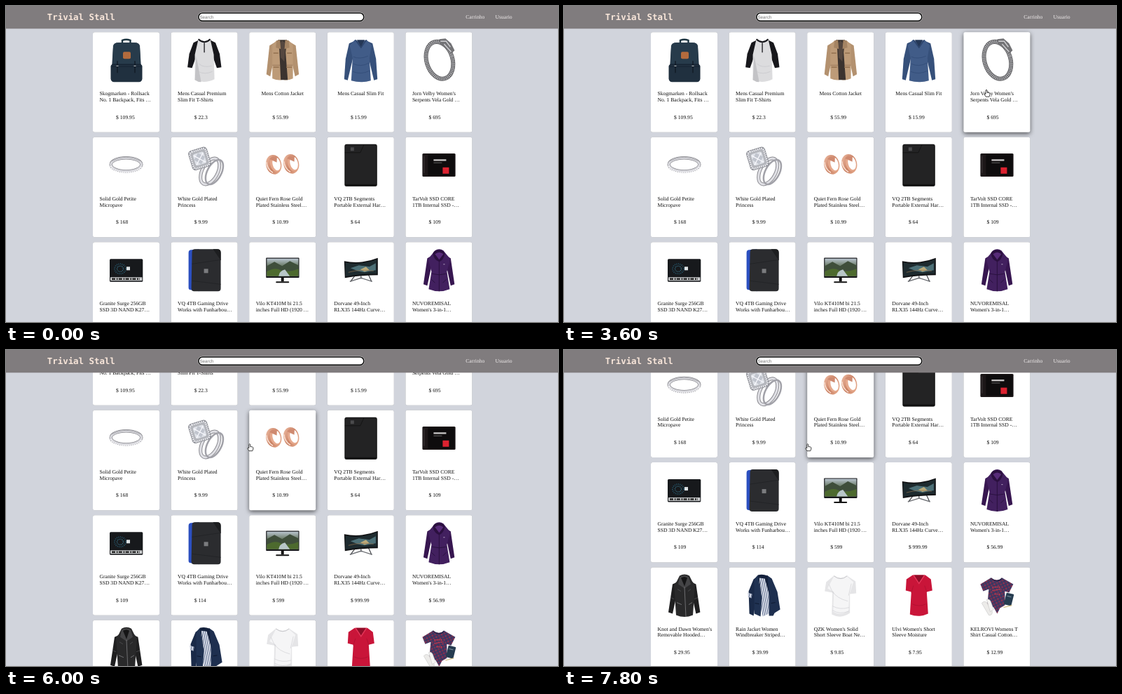
An HTML page for the animation above (8000 ms loop, 788 by 450 pixels).

```html
<!DOCTYPE html>
<html lang="pt">
<head>
<meta charset="utf-8">
<title>Trivial Stall</title>
<style>
  html, body { margin: 0; width: 100%; height: 100%; overflow: hidden; background: #d1d4dc; }
  svg { display: block; }
  text { font: 7.6px "Liberation Serif", serif; fill: #111; text-rendering: geometricPrecision; }
  .card > rect:first-child { fill: #fff; filter: drop-shadow(.8px .8px .6px rgba(0,0,0,.38)); }
  .card.hover > rect:first-child { filter: drop-shadow(0 2px 3px rgba(0,0,0,.6)); }
  .nav { fill: #f1eeee; }
  .brand { font: bold 12.4px "DejaVu Sans Mono", monospace; fill: #f8e6da; }
  .hint { font: 6.3px "Liberation Sans", sans-serif; fill: #757575; }
</style>
</head>
<body>
<svg width="788" height="450" viewBox="0 0 788 450">
  <defs>
    <linearGradient id="scene" x2="0" y2="1">
      <stop offset="0" stop-color="#b9c4cf"/><stop offset=".4" stop-color="#6d7d6a"/>
      <stop offset=".65" stop-color="#3d5330"/><stop offset="1" stop-color="#8a8f92"/>
    </linearGradient>
    <linearGradient id="silver" y2="1">
      <stop offset="0" stop-color="#8d8d92"/><stop offset=".5" stop-color="#e2e2e6"/>
      <stop offset="1" stop-color="#85858b"/>
    </linearGradient>
    <linearGradient id="rose" y2="1">
      <stop offset="0" stop-color="#f3c5ad"/><stop offset=".5" stop-color="#c87f62"/>
      <stop offset="1" stop-color="#f0b899"/>
    </linearGradient>
    <pattern id="stripes" width="3" height="3" patternUnits="userSpaceOnUse" patternTransform="rotate(12)">
      <rect width="3" height="3" fill="#dfe4ee"/><rect width="1.2" height="3" fill="#6b7896"/>
    </pattern>
    <pattern id="floral" width="6" height="6" patternUnits="userSpaceOnUse" patternTransform="rotate(20)">
      <rect width="6" height="6" fill="#3b3763"/><circle cx="1.5" cy="1.5" r="1.2" fill="#a52d48"/>
      <circle cx="4.5" cy="4.5" r="1.2" fill="#8c3049"/>
    </pattern>
  </defs>
  <g id="shelf"></g>
  <rect width="788" height="32.3" fill="#807c7e"/>
  <text class="brand" x="58.8" y="20">Trivial Stall</text>
  <rect x="273.6" y="8.8" width="238.4" height="13.8" rx="6.9" fill="#e8e8e8"/>
  <rect x="274.8" y="10" width="236" height="11.4" rx="5.7" fill="#fff" stroke="#0a0a0a" stroke-width="1.6"/>
  <text class="hint" x="276.4" y="18.2">Search</text>
  <text class="nav" x="656.3" y="18.3">Carrinho</text>
  <text class="nav" x="698.6" y="18.3">Usuario</text>
  <g id="cursor" stroke="#111" stroke-width=".8" stroke-linejoin="round" fill="#fff">
    <path id="hand" d="M-1 1Q0-.6 1 1V4.2Q4.6 4 5 5.4V7.6L4 10.2H-.8L-3 6.6Q-3 5.2-1 6.4Z"/>
    <path id="arrow" d="M0 0V9L2 7.2 3.4 10.2 4.7 9.6 3.4 6.7H6.2Z" fill="#111" stroke="#fff"/>
  </g>
</svg>
<script>
const path = (d, fill, more = '') => `<path d="${d}" fill="${fill}" ${more}/>`;
const line = (d, color, width = .7, more = '') =>
  path(d, 'none', `stroke="${color}" stroke-width="${width}" ${more}`);
const box = (x, y, w, h, fill, r = 0) =>
  `<rect x="${x}" y="${y}" width="${w}" height="${h}" rx="${r}" fill="${fill}"/>`;
const oval = (x, y, rx, ry, fill, more = '') =>
  `<ellipse cx="${x}" cy="${y}" rx="${rx}" ry="${ry}" fill="${fill}" ${more}/>`;
const ring = (x, y, rx, ry, color, width, more = '') =>
  oval(x, y, rx, ry, 'none', `stroke="${color}" stroke-width="${width}" ${more}`);
const turn = (deg, x, y, s) => `<g transform="rotate(${deg} ${x} ${y})">${s}</g>`;
const mirror = s => s + `<g transform="matrix(-1 0 0 1 95.4 0)">${s}</g>`;

// Each picture is drawn in the coordinates of its card.
const backpack = line('M42 18V11.5Q47.7 9.5 53.5 11.5V18', '#1c3440', 2.4) +
  box(25.5, 46, 45, 23, '#1c2c3a', 3) +
  path('M29 20Q30 15 36 15H60Q66 15 67 20L70 68Q69 71 66 71H30Q27 71 26 68Z', '#20303f') +
  path('M29 20Q30 15 36 15H60Q66 15 67 20L68 45H28Z', '#273b4b') +
  line('M27 46H69M27 49H69', '#141f2b') + line('M35 41V58M60 41V58', '#121b25', 1.4) +
  line('M33.5 48H36.5M58.5 48H61.5', '#a9b0b4', 1.2) + box(43, 28, 11, 10, '#b36b3d', 2);

const raglan = mirror(path('M40 11L32 15 26 31 23.5 50 30 51 36 34Z', '#17171b')) +
  path('M39 10Q47.7 15 56 10L61 32 62 67Q48 74 34 68L34 32Z', '#dcdcde') +
  path('M36 34L34 68Q38 71 43 71Z', '#c3c3c6') +
  line('M39 10Q47.7 18 56 10', '#17171b', 2) + line('M47.5 15V29', '#25252a', 1.4) +
  line('M40 45Q46 51 58 48M39 56Q48 61 59 56', '#c6c6ca');

const jacket = mirror(path('M39 13L29 19 24.5 60 30 63 35 40Z', '#b3916f') +
  path('M39 12L33 18 33 66Q40 69 46 68V18Z', '#bd9b78')) +
  path('M41 11H54L52 29 55 68H45L43 25Z', '#3b332f') +
  path('M44 16L47 12 52 16 50 42 45 36Z', '#55473f') +
  mirror(path('M39 12L44 11 45 24 38 22Z', '#a58463') + box(34.5, 29, 7, 1.6, '#967452') +
    box(34.5, 49, 8, 1.6, '#967452')) + line('M33 47H44M53 47H62', '#8f6e4f');

const sweater = mirror(path('M40 12L31 16 26 38 24 67 29 68.5 36 39Z', '#36507a')) +
  path('M39 11Q47.7 15 56 11L63 19 60 37 62 69Q48 73 34 69L36 37 32 19Z', '#415c88') +
  path('M42 11H53.5L48 21Z', '#243756') + line('M40 11L48 22 55.5 11', '#2c436a', 1.5) +
  line('M37 35Q46 39 58 34M37 45Q48 50 59 44M36 56Q48 61 60 55', '#304a74');

const bracelet = turn(-17, 48.5, 40,
  ring(48.5, 40, 18.5, 27, '#606063', 6) + ring(48.5, 40, 18.5, 27, '#bdbdc0', 4.2, 'stroke-dasharray="1.3 1.1"') +
  ring(48.5, 40, 18.5, 27, '#77777a', .8)) +
  path('M48 10L57 9 65 16 70 26 65 31 59 24 50 18Z', '#737376') +
  line('M50 13L58 13 64 21M55 17L65 28', '#d0d0d3', 1.4);

const band = ring(47.5, 39, 21.8, 9.6, '#85858b', 4.4) + ring(47.5, 39, 21.8, 9.6, '#d9d9de', 3) +
  line('M25.7 41A21.8 9.6 0 0 0 69.3 41', '#f9f9fb', 2.5, 'stroke-dasharray="1.6 1.2"') +
  line('M27 34Q47 23 68 34', '#a9a9ae', 1);

const solitaire = turn(28, 56, 50, ring(55, 49, 11, 20, '#8b8b91', 5) + ring(55, 49, 11, 20, '#e0e0e5', 3) +
  ring(61, 47, 10, 19, '#a1a1a8', 2.5)) +
  turn(-17, 41, 31, box(27, 16, 28, 29, '#8c8e95', 5) +
  '<rect x="29" y="18" width="24" height="25" rx="4" fill="#b4b6bc" stroke="#f2f2f6" stroke-width="2.4" stroke-dasharray="1.5 1.3"/>' +
  box(33, 22, 16, 17, '#dfe2e8', 3) + path('M33 30L41 22 49 30 41 39Z', '#c1c5ce') +
  line('M34 24L48 38M48 24L34 38', '#fafaff', 1.2));

const hoop = (x, y, deg) => turn(deg, x, y, oval(x, y, 11, 14, 'url(#rose)') +
  oval(x + 2.5, y, 7.5, 11, '#e6a98d') + oval(x + 4, y, 5.5, 9.5, '#fff') +
  path(`M${x - 4} ${y - 9}Q${x + 1} ${y - 13} ${x + 7} ${y - 9}L${x + 5} ${y - 2}Q${x} ${y - 5}${x - 4} ${y - 3}Z`, '#cf8a70') +
  line(`M${x - 9} ${y - 6}Q${x - 11} ${y + 3} ${x - 4} ${y + 11}`, '#fbe3d6', 1.4));
const hoops = hoop(35, 39, -14) + hoop(60, 38, -14);

const drive = box(24.5, 10, 46.5, 60, '#191919', 3) + box(26, 11, 43.5, 57, '#232324', 2) +
  line('M25 22H47L52 11', '#111', .8) + box(33, 14.5, 5, 5, '#4b4b4d') + box(25, 67, 45.5, 2.6, '#111', 1);

const ssd = box(24, 23.3, 47.2, 33, '#1c1718', 1.5) + box(32, 25, 38, 29.5, '#0e0c0d') +
  box(40, 31.5, 18, 2.3, '#c8c6c6') + box(40, 36, 12, .8, '#777') + box(53, 43, 9, 9, '#dc2230') +
  box(26, 27, 1, 24, '#40383a');

const chipSsd = box(24, 24, 47.3, 32.5, '#17191c', 1.5) + box(25, 50, 45.3, 4.8, '#d0d2d3') +
  line('M27 52.4H67', '#222', 2.6, 'stroke-dasharray="5 1.6 2 1.2"') +
  ring(39, 38, 8, 7, '#24576d', 2, 'stroke-dasharray="1 1.5"') +
  ring(39, 38, 4.5, 4, '#3a7b92', 1.3, 'stroke-dasharray="1 1.2"') + box(48, 35, 5, 5, '#dfe4e6');

const blueDrive = path('M25 15Q25 11 29 11L40 10V70L28 68Q25 68 25 65Z', '#2b4fc0') +
  path('M30 14Q30 10 34 10H66Q71 10 71 15V66Q71 70 67 70H33Q29 70 29 66Z', '#2b2c2f') +
  path('M60 10H66Q71 10 71 15V26Z', '#1d1e20') + line('M30 31L71 25M30 55L71 60', '#202124') +
  box(47, 38, 6, 6, '#7b7c7f');

const monitor = box(24, 22.3, 47.3, 28.5, '#16171a', .8) + box(25.2, 23.4, 45, 25, 'url(#scene)') +
  path('M25.2 34L36 28 47 34 58 27 70.2 33V41H25.2Z', '#3f4e3b') +
  path('M25.2 42Q37 35 45 40T70.2 38V48.4H25.2Z', '#4d6a2e') +
  path('M42 48.4Q43 41 51 39L58 48.4Z', '#b8c6c8') + box(45.5, 50, 4, 6, '#151515') +
  box(38, 56, 19, 2, '#151515', 1);

const wide = line('M39 48L33 56M58 45L63 56M48 48V52', '#4b4d51', 1.3) + line('M32 56L48 51 64 56', '#6b6d72', 1.3) +
  path('M24 27Q48 32 72 22.5V47Q48 47 25 51Z', '#111214') +
  path('M25.5 29Q48 33.5 70.5 24.5V45Q48 45 26 49Z', '#1e2b2f') +
  path('M33 37L45 33 60 35 69 30V40L53 43 43 41Z', '#4d7077') +
  path('M47 39L55 35 60 40 53 42Z', '#bcab7b') + line('M30 43Q48 38 66 41', '#92724e');

const parka = mirror(path('M40 18L31 23 25.5 60 31 62 36 39Z', '#371650')) +
  path('M38 17L42 12Q48 8 54 12L58 17 64 24 59 42 63 67Q48 73 33 67L37 42 32 24Z', '#42205f') +
  path('M39 16Q41 11 48 11T56 17Q54 26 48 28 40 25 39 16Z', '#2b103f') +
  path('M42 17Q48 12 54 17L48 25Z', '#572b78') + line('M48 27V70M38 45Q48 48 58 45M37 53L42 58M58 53L53 58', '#28103b', .9) +
  box(54, 31, 2, 1, '#b8a6c6');

const biker = mirror(path('M40 20L31 24 25 64 31 66 36 43Z', '#1f1f20')) +
  path('M37 20L41 12Q48 8 55 12L59 20 63 25 60 68Q48 73 36 68L33 25Z', '#29292a') +
  path('M41 14Q48 9 54 14L57 24 48 30 39 24Z', '#444446') + path('M43 15Q48 12 52 15L48 27Z', '#151516') +
  line('M48 28L50 70M37 50L44 53M59 50L54 53', '#8c8c8e') +
  line('M38 31L43 34M57 31L53 34M28 43L33 45M67 43L62 45', '#57575a');

const blazer = path('M42 12L35 17 28 34 29 66 35 69 39 43 53 43Z', '#1a2a48') +
  path('M43 13L57 14 61 64 48 70 40 37Z', 'url(#stripes)') +
  path('M41 11L36 17 36 66 45 70 47 44Z', '#203252') +
  path('M54 11L61 16 69 35 73 60 65 65 63 69 57 69 57 40Z', '#1e2f4f') +
  path('M41 11Q48 9 55 12L57 37 51 16 43 15 47 43Z', '#14213c') +
  path('M27 36L33 38 32 44 27 42Z', 'url(#stripes)') + line('M37 51L43 52M60 51L66 50', '#0e1930', 1);

const blouse = path('M38 12Q48 18 57 12L69 20 70 37 61 38 61 65Q48 74 35 67L36 36 25 34 27 21Z', '#e5e5e7') +
  path('M38 13Q48 19 57 13L66 21 60 39 59 62Q47 70 37 63L38 35 29 30Z', '#f5f5f6') +
  line('M38 12Q48 20 57 12', '#c6c6ca', 1) +
  line('M36 34Q42 44 58 48M36 55Q47 61 60 57M36 61Q47 68 60 62M63 23L59 40M31 24L37 37', '#d1d1d6');

const tee = path('M39 11L57 11 65 17 67 33 59 35 61 66Q48 72 35 67L37 35 29 33 30 17Z', '#c91539') +
  path('M41 11H55L48 22Z', '#8f0d28') + line('M40 11L48 23 56 11', '#e3375a', 1.4) +
  line('M37 36L40 26M59 35L56 26M38 52Q48 57 58 52', '#a90f2e');

const knot = path('M39 15Q48 21 55 15L71 24 65 36 59 34 59 54 52 58 48 66 43 57 34 52 36 31 28 34 24 24Z', 'url(#floral)') +
  line('M39 15Q48 23 55 15', '#221f42', 1.2) +
  line('M41 28H53M41 33L54 31M44 38H52', '#d23a4c', 1.4, 'stroke-dasharray="2 1"') +
  path('M26 51Q29 47 33 50L41 63Q41 69 36 68Z', '#ecebe9', 'stroke="#bbb" stroke-width=".5"') +
  path('M33 46Q37 44 39 49L43 60 38 63Z', '#f5f4f2', 'stroke="#bbb" stroke-width=".5"') +
  turn(14, 65, 46, box(59, 37, 11, 17, '#263c50', 1) + box(61, 41, 6, 1, '#7d93a0')) +
  line('M57 57L69 54', '#d8c58d', 1.2);

const products = [
  [backpack, '109.95', 'Skogmarken - Rollsack', 'No. 1 Backpack, Fits …'],
  [raglan, '22.3', 'Mens Casual Premium', 'Slim Fit T-Shirts'],
  [jacket, '55.99', 'Mens Cotton Jacket'],
  [sweater, '15.99', 'Mens Casual Slim Fit'],
  [bracelet, '695', "Jorn Velby Women's", 'Serpents Vela Gold …'],
  [band, '168', 'Solid Gold Petite', 'Micropave'],
  [solitaire, '9.99', 'White Gold Plated', 'Princess'],
  [hoops, '10.99', 'Quiet Fern Rose Gold', 'Plated Stainless Steel…'],
  [drive, '64', 'VQ 2TB Segments', 'Portable External Har…'],
  [ssd, '109', 'TarVolt SSD CORE', '1TB Internal SSD -…'],
  [chipSsd, '109', 'Granite Surge 256GB', 'SSD 3D NAND K27…'],
  [blueDrive, '114', 'VQ 4TB Gaming Drive', 'Works with Funharbou…'],
  [monitor, '599', 'Vilo KT410M bi 21.5', 'inches Full HD (1920 …'],
  [wide, '999.99', 'Dorvane 49-Inch', 'RLX35 144Hz Curve…'],
  [parka, '56.99', 'NUVOREMISAL', "Women's 3-in-1…"],
  [biker, '29.95', "Knot and Dawn Women's", 'Removable Hooded…'],
  [blazer, '39.99', 'Rain Jacket Women', 'Windbreaker Striped…'],
  [blouse, '9.85', "QZK Women's Solid", 'Short Sleeve Boat Ne…'],
  [tee, '7.95', "Ulvi Women's Short", 'Sleeve Moisture'],
  [knot, '12.99', 'KELROVI Womens T', 'Shirt Casual Cotton…'],
];

const CARD_W = 95, CARD_H = 142.4;
const spot = i => [124 + i % 5 * 111.6, 37.3 + Math.floor(i / 5) * 149.5];
const $ = id => document.getElementById(id);

$('shelf').innerHTML = products.map(([art, price, first, second], i) => {
  const title = second
    ? `<text x="9.5" y="90.2">${first}</text><text x="9.5" y="98.8">${second}</text>`
    : `<text x="47.5" y="90.2" text-anchor="middle">${first}</text>`;
  return `<g class="card" transform="translate(${spot(i)})">${box(0, 0, CARD_W, CARD_H, '#fff', 2.5)}` +
    `${art}${title}<text x="33.1" y="123.4">$ ${price}</text></g>`;
}).join('');
const cards = [...$('shelf').children];

// Keys are [time, ...values], joined linearly.
const pointer = [[200, 103, 55], [400, 103, 55], [1000, 135, 75], [1600, 205, 80], [1800, 287, 58],
  [2200, 305, 85], [2800, 190, 110], [3600, 603, 119], [4000, 600, 122], [5200, 347.8, 133.5]];
const scrolling = [[5200, 0], [6000, 101], [7000, 151], [7800, 176.2]];

function at(keys, t) {
  const n = keys.findIndex(k => k[0] > t);
  if (n < 1) return keys.at(n).slice(1);
  const [a, b] = [keys[n - 1], keys[n]];
  const f = (t - a[0]) / (b[0] - a[0]);
  return a.slice(1).map((v, i) => v + (b[i + 1] - v) * f);
}

function draw(now) {
  const t = Math.floor(now % 8000 / 200) * 200;
  const [x, y] = at(pointer, t), [scroll] = at(scrolling, t);
  let over = false;
  cards.forEach((card, i) => {
    const [left, top] = spot(i), dx = x - left, dy = y + scroll - top;
    const hit = t > 0 && dx >= 0 && dx < CARD_W && dy >= 0 && dy < CARD_H;
    card.classList.toggle('hover', hit);
    over ||= hit;
  });
  $('shelf').setAttribute('transform', `translate(0 ${-scroll})`);
  $('cursor').setAttribute('transform', `translate(${x} ${y})`);
  $('cursor').style.display = t ? '' : 'none';
  $('hand').style.display = over ? '' : 'none';
  $('arrow').style.display = over ? 'none' : '';
}

const start = performance.now();
(function tick() {
  draw(performance.now() - start);
  requestAnimationFrame(tick);
})();
</script>
</body>
</html>
```
